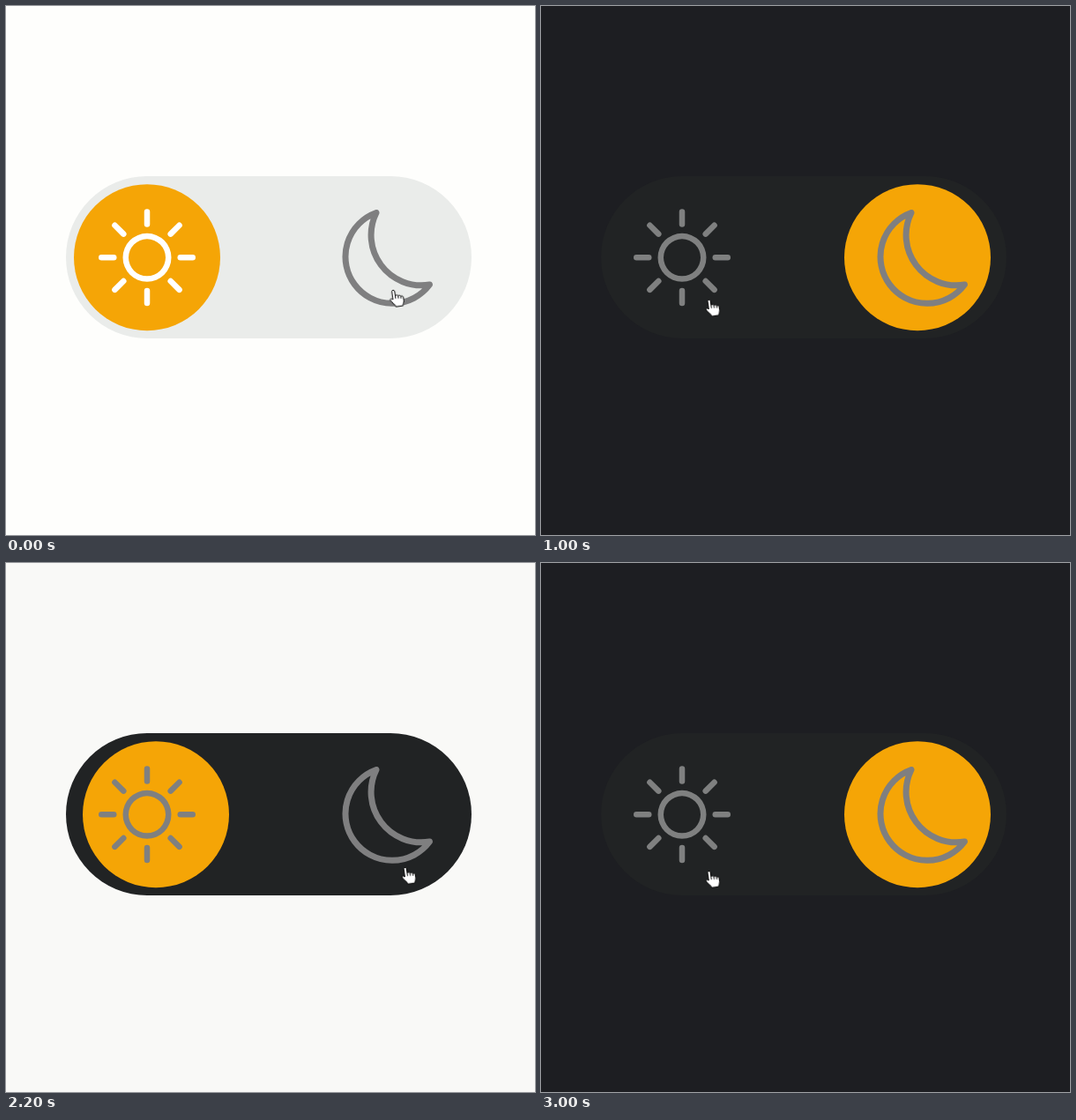
Write an HTML page without scripts that moves like this. It is 600 px wide and 600 px high and loops after 3100 ms.

```html
<!DOCTYPE html>
<html lang="en">
<head>
<meta charset="utf-8">
<title>Day and night switch</title>
<style>
  html, body { margin: 0; width: 100%; height: 100%; overflow: hidden; background: #fefefc; }
  svg { display: block; width: 100vw; height: 100vh; }

  /* The scene ticks at ten steps a second; the pointer glides. */
  .night, .knob, .themed { animation: 3100ms step-end infinite; }
  .night { fill: #1d1e22; animation-name: dusk; }
  .knob { fill: #f5a506; animation-name: slide; }
  .themed { fill: var(--day); animation-name: theme; }
  .pill { --day: #eaecea; --night: #212324; }
  .sun { --day: #fff; --night: #7f8080; }
  .moon { fill: none; stroke: #7f7f80; stroke-width: 7; stroke-linejoin: round; }
  .pointer { animation: point 3100ms ease-in-out infinite; }
  .hand { fill: #fff; stroke: #000; stroke-linejoin: round; }

  @keyframes theme {
    0%, 38.7% { fill: var(--day); }
    6.45%, 70.96%, 100% { fill: var(--night); }
  }

  /* 500 ms ease */
  @keyframes dusk {
    0%, 6.45% { opacity: 0; }
    9.67% { opacity: .309; }
    12.9% { opacity: .69; }
    16.12% { opacity: .888; }
    19.35% { opacity: .977; }
    22.58% { opacity: 1; }
    38.7% { opacity: .905; }
    41.93% { opacity: .492; }
    45.16% { opacity: .198; }
    48.38% { opacity: .061; }
    51.61% { opacity: .006; }
    54.83% { opacity: 0; }
    70.96% { opacity: .02; }
    74.19% { opacity: .374; }
    77.41% { opacity: .727; }
    80.64% { opacity: .906; }
    83.87% { opacity: .984; }
    87.09%, 100% { opacity: 1; }
  }

  /* 300 ms ease */
  @keyframes slide {
    0%, 6.45% { transform: none; }
    9.67% { transform: translateX(158.6px); }
    12.9% { transform: translateX(248.4px); }
    16.12% { transform: translateX(267px); }
    38.7% { transform: translateX(207.6px); }
    41.93% { transform: translateX(52.5px); }
    45.16% { transform: translateX(4.4px); }
    48.38% { transform: none; }
    70.96% { transform: translateX(10px); }
    74.19% { transform: translateX(178.2px); }
    77.41% { transform: translateX(254px); }
    80.64%, 100% { transform: translateX(267px); }
  }

  @keyframes point {
    0%, 20.97% { transform: translate(439px, 322px); }
    35.48%, 51.61% { transform: translate(163px, 334px); }
    67.74%, 83.87% { transform: translate(452.5px, 345px); }
    98.39%, 100% { transform: translate(184px, 349.2px); }
  }
</style>
</head>
<body>
<svg viewBox="0 0 600 600">
  <defs>
    <rect id="ray" x="-3.25" y="-55" width="6.5" height="20.5" rx="3.25"/>
    <g id="cross">
      <use href="#ray"/>
      <use href="#ray" transform="rotate(90)"/>
      <use href="#ray" transform="rotate(180)"/>
      <use href="#ray" transform="rotate(270)"/>
    </g>
  </defs>

  <rect class="night" width="600" height="600"/>
  <rect class="themed pill" x="68" y="193" width="460" height="184" rx="92"/>
  <circle class="knob" cx="160" cy="285.2" r="83"/>

  <g transform="translate(160 285.3)">
    <g class="themed sun">
      <path fill-rule="evenodd" d="M-27.5 0a27.5 27.5 0 1 1 55 0a27.5 27.5 0 1 1-55 0zM-21 0a21 21 0 1 0 42 0a21 21 0 1 0-42 0z"/>
      <use href="#cross"/>
      <use href="#cross" transform="rotate(45)"/>
    </g>
  </g>

  <path class="moon" d="M420 234.5A57 57 0 0 0 480.5 316A53 53 0 1 1 420 234.5Z"/>

  <g class="pointer">
    <g class="hand" transform="rotate(-8)">
      <path d="M-1.7 1.8C-1.7 0 1.5 0 1.6 1.8V7.2C2 5.9 4.6 6 4.8 7.7C5.4 6.7 7.6 7 7.8 8.5C8.6 7.9 10.4 8.2 10.4 9.8V13.5C10.4 16 9 16.8 8.7 19.3H.5C.3 17-2.8 14.5-4.6 11.6C-5.4 9.6-3.2 9-1.7 11Z"/>
      <path d="M1.6 7.2v3M4.8 7.7v2.8M7.8 8.5v2.4"/>
    </g>
  </g>
</svg>
</body>
</html>
```
